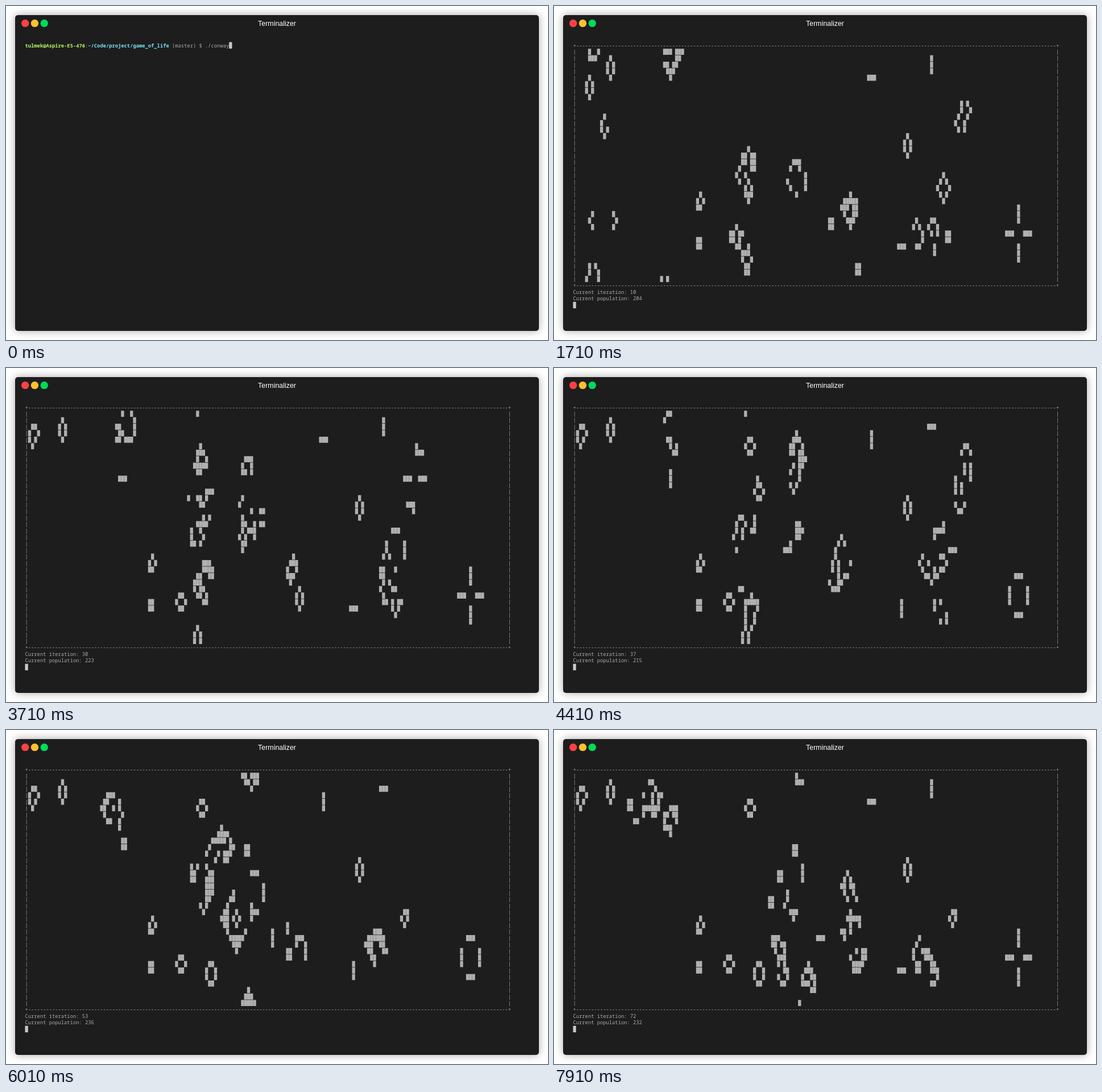
These frames come from a looping animation (953x588 px, 8000 ms). An HTML page with a canvas:

```html
<!DOCTYPE html>
<html lang="en">
<head>
<meta charset="utf-8">
<title>Game of Life</title>
<style>
  html, body { margin: 0; width: 100%; height: 100%; overflow: hidden; background: #fff; }
  canvas { display: block; width: 953px; height: 588px; }
</style>
</head>
<body>
<canvas id="stage" width="953" height="588"></canvas>
<script>
const ctx = document.getElementById('stage').getContext('2d');

const LOOP = 8000, START = 710, STEP = 100;
const COLS = 160, ROWS = 36, SETTLED = 10, LAST = 72;
const CELL_W = 5.275, CELL_H = 11.43, LEFT = 33.5, MIDDLE = 69.4;
const MONO = '8.79px "Noto Sans Mono", "DejaVu Sans Mono", monospace';
const GREY = '#a9a9a9', BLOCK = '#b0b0b0', CURSOR = '#c8c8c8';

// Life patterns in plaintext notation, rows split by "/".
const block = 'OO/OO';
const rowBlinker = 'OOO';
const columnBlinker = 'O/O/O';
const beehive = '.O./O.O/O.O/.O.';
const boat = '.O./O.O/OO.';
const ring = '..O/.O.O/O...O/.O.O/..O';
const hook = '.O/O/O.O/.O';
const brackets = '.O......O/O........O/.O......O';
const heart = 'O.O/.OOO.OOO/.....OO/.OO.OO/..OOO/...O';
const bell = '.O.O/.O..O/O...O/.O..O/.OOO';
const zigzag = '..O.O/..O..O/.O..O/O..O/.O.O';
const tower = '....O/..OO.OO/..OO.OO/.O...OO/O..O/.O..O/...O.O/...OOO/....O';
const bowl = '..OOO/.O..O/......O/O.....O/.O....O/...O';
const flower = '...O/.OOOOO/OOO.OO/.O..OO/..OOO/...O';
const antlers = '.O....OO/O.O..O..O/...O..O.O/...O/.OO....O/.......O';
const snake = '..O/OO.OO/OO.O/..OO..O/....OOO/....O..O/.....OO/.....OO';

const placements = [
  [block, 85, 27], [block, 41, 30], [block, 124, 29], [block, 94, 34],
  [rowBlinker, 98, 5], [rowBlinker, 144, 29], [rowBlinker, 150, 29], [rowBlinker, 108, 31],
  [columnBlinker, 119, 2], [columnBlinker, 148, 25], [columnBlinker, 148, 31],
  [beehive, 11, 2], [beehive, 4, 5], [beehive, 110, 14],
  [boat, 41, 23], [ring, 121, 20], [hook, 9, 11], [brackets, 5, 26],
  [heart, 29, 36], [bell, 4, 34], [zigzag, 127, 9], [tower, 54, 16],
  [bowl, 71, 18], [flower, 89, 23], [antlers, 113, 27], [snake, 52, 28]
];

// The board is a torus; columns and rows count from 1.
const indexOf = (col, row) =>
  (row - 1 + ROWS) % ROWS * COLS + (col - 1 + COLS) % COLS;

function stamp(board, [pattern, col, row]) {
  pattern.split('/').forEach((line, dy) => [...line].forEach((ch, dx) => {
    if (ch === 'O') board[indexOf(col + dx, row + dy)] = 1;
  }));
}

function evolve(board) {
  const next = new Uint8Array(board.length);
  for (let row = 1; row <= ROWS; row++) {
    for (let col = 1; col <= COLS; col++) {
      const here = indexOf(col, row);
      let near = -board[here];
      for (let dy = -1; dy <= 1; dy++) {
        for (let dx = -1; dx <= 1; dx++) near += board[indexOf(col + dx, row + dy)];
      }
      next[here] = near === 3 || (near === 2 && board[here]) ? 1 : 0;
    }
  }
  return next;
}

function seeded(seed) {
  return () => (seed = (seed * 1664525 + 1013904223) >>> 0) / 4294967296;
}

function buildBoards() {
  const boards = [];
  boards[SETTLED] = new Uint8Array(COLS * ROWS);
  placements.forEach(p => stamp(boards[SETTLED], p));
  for (let n = SETTLED; n < LAST; n++) boards[n + 1] = evolve(boards[n]);

  // Opening: the same colonies in matching phase, amid dust that dies out.
  const random = seeded(17);
  for (let n = 0; n < SETTLED; n++) {
    const density = 0.06 * 0.35 ** n;
    boards[n] = boards[2 * SETTLED - n].map(alive => random() < density ? 1 : alive);
  }
  return boards;
}

const boards = buildBoards();
const cellX = col => LEFT + col * CELL_W;
const rowY = row => MIDDLE + row * CELL_H;

function print(text, col, row, color = GREY, weight = '') {
  ctx.font = weight + ' ' + MONO;
  ctx.fillStyle = color;
  ctx.textAlign = 'left';
  [...text].forEach((ch, i) => ctx.fillText(ch, cellX(col + i), rowY(row) + 3.1));
}

function drawCursor(col, row) {
  ctx.fillStyle = CURSOR;
  ctx.fillRect(cellX(col), rowY(row) - 5.8, CELL_W, 11.4);
}

function drawWindow() {
  ctx.fillStyle = '#fff';
  ctx.fillRect(0, 0, 953, 588);
  ctx.save();
  ctx.shadowColor = 'rgba(0,0,0,.35)';
  ctx.shadowBlur = 15;
  ctx.fillStyle = '#1d1d1d';
  ctx.beginPath();
  ctx.roundRect(16, 16, 921, 556, 5);
  ctx.fill();
  ctx.restore();

  ['#ff4146', '#fdc02f', '#00d95a'].forEach((color, i) => {
    ctx.fillStyle = color;
    ctx.beginPath();
    ctx.arc(33.7 + i * 16.8, 30.4, 6.7, 0, Math.PI * 2);
    ctx.fill();
  });
  ctx.font = '12.4px "Liberation Sans", Arial, sans-serif';
  ctx.fillStyle = '#fff';
  ctx.textAlign = 'center';
  ctx.fillText('Terminalizer', 476.5, 35);
}

function drawPrompt() {
  const parts = [
    ['tulmek@Aspire-E5-476', '#b3f763', 'bold'],
    [':', GREY, ''],
    ['~/Code/project/game_of_life', '#7ce3f7', 'bold'],
    [' (master) $ ./conway', GREY, '']
  ];
  let col = 0;
  for (const [text, color, weight] of parts) {
    print(text, col, 0, color, weight);
    col += text.length;
  }
  drawCursor(col, 0);
}

function drawBoard(n) {
  const edge = '+' + '-'.repeat(COLS) + '+';
  print(edge, 0, 0);
  print(edge, 0, ROWS + 1);
  for (let row = 1; row <= ROWS; row++) {
    print('|', 0, row);
    print('|', COLS + 1, row);
  }

  let population = 0;
  ctx.fillStyle = BLOCK;
  boards[n].forEach((alive, i) => {
    if (!alive) return;
    population++;
    const row = Math.floor(i / COLS) + 1;
    ctx.fillRect(cellX(i % COLS + 1), rowY(row) - 5.6, CELL_W + 0.05, 10.7);
  });

  print('Current iteration: ' + n, 0, ROWS + 2);
  print('Current population: ' + population, 0, ROWS + 3);
  drawCursor(0, ROWS + 4);
}

let shown = null;
function frame() {
  const time = performance.now() % LOOP;
  const n = Math.min(LAST, Math.floor((time - START) / STEP));
  const scene = Math.max(-1, n);
  if (scene !== shown) {
    shown = scene;
    drawWindow();
    if (scene < 0) drawPrompt();
    else drawBoard(scene);
  }
  requestAnimationFrame(frame);
}
frame();
</script>
</body>
</html>
```
